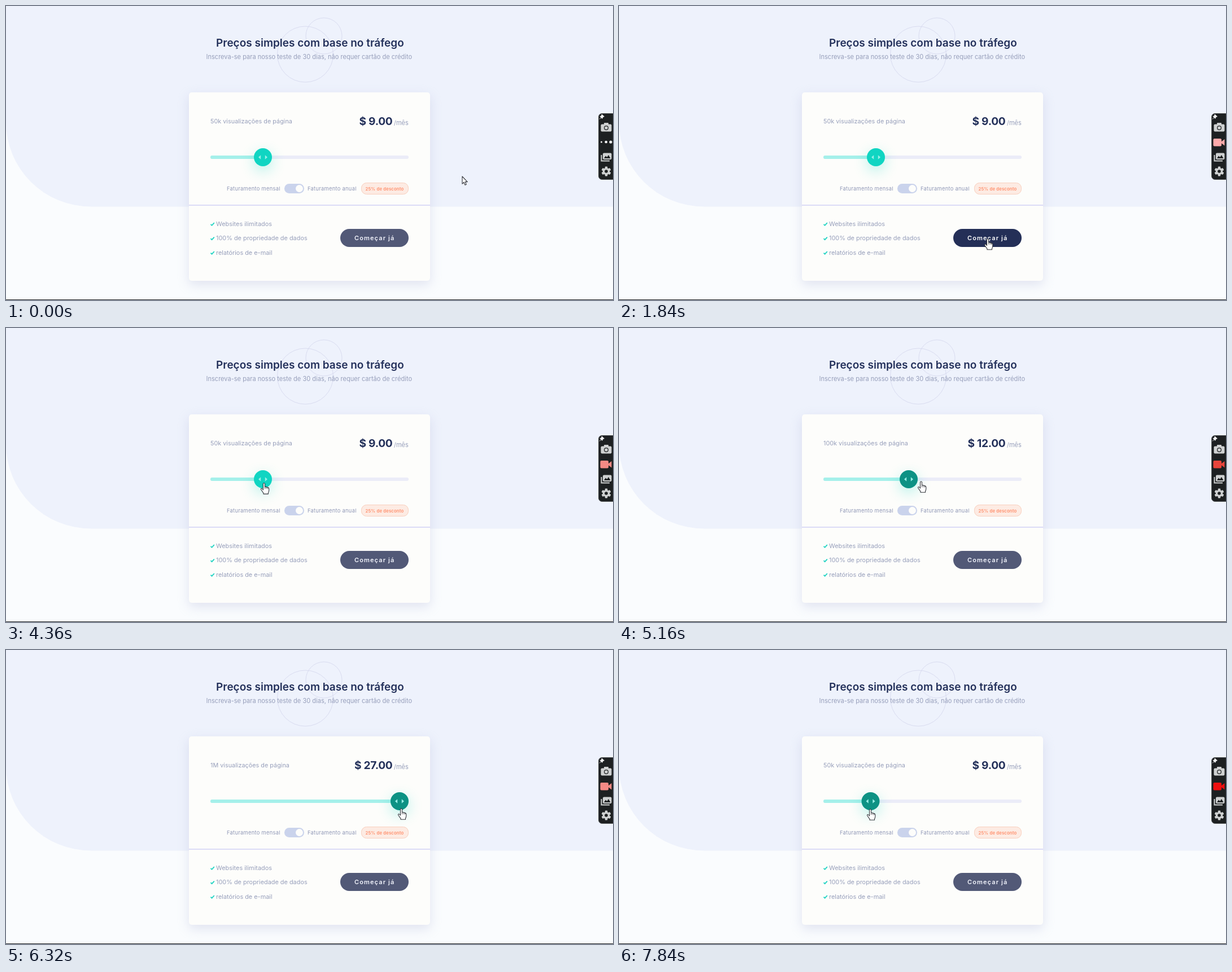
Recreate the animation shown at these times as an HTML page with a canvas. Size 1075 px wide and 521 px high, loop 8000 ms.

```html
<!DOCTYPE html>
<html lang="pt">
<head>
<meta charset="utf-8">
<title>Preços</title>
<style>
html, body { margin: 0; width: 100%; height: 100%; overflow: hidden; background: #fafcfe; }
canvas { display: block; width: 1075px; height: 521px; }
</style>
</head>
<body>
<canvas id="stage" width="1075" height="521"></canvas>
<script>
const ctx = document.getElementById('stage').getContext('2d');
const LOOP = 8000, STEP = 40;
const TEAL = '#10d5c2', NAVY = '#23305a', GREY = '#979fbb', ICON = '#cfd1d1', BAR = '#1d2021';

// time, x, y of the pointer tip
const pointerPath = [
  [0, 808, 302], [80, 808, 302], [640, 758.5, 360.5], [1200, 668, 411], [1840, 653.5, 412.5],
  [2120, 600, 436], [2560, 470, 432], [3160, 502.5, 329], [3720, 502.5, 329],
  [4300, 457, 275], [4600, 459, 274], [5160, 535.5, 272], [6320, 700.5, 281],
  [6520, 700.5, 281], [7840, 445.5, 282]
];
const knobPath = [[4600, 455], [5160, 513], [6320, 697], [6520, 697], [7840, 445.5]];
const plans = [['10k', '6'], ['50k', '9'], ['100k', '12'], ['500k', '18'], ['1M', '27']];
const recColors = [
  [1400, '#ffaaaa'], [2440, '#e8453c'], [3440, '#f48a85'],
  [4480, '#e8453c'], [5600, '#f48a85'], [6560, '#ee0f0f']
];

const arrow = new Path2D('M0 0V13.2L3 10.4L5 15.2L7.2 14.2L5.2 9.6H9.2Z');
const hand = new Path2D('M-2 1.5Q-2 0 -.5 0Q1 0 1 1.5V6.3L3.3 6.8L6 7.6Q8.3 8.2 8.3 10V13Q8 16 7 17.3V19.3H-1.5V17.6L-5.5 12Q-6.5 10 -5 9.5Q-4 9.3 -2 12Z');
const fingers = new Path2D('M1 6V10M3.5 7V10.3M6 7.8V10.6');

function along(path, t) {
  if (t <= path[0][0]) return path[0].slice(1);
  for (let i = 1; i < path.length; i++) {
    const a = path[i - 1], b = path[i];
    if (t <= b[0]) {
      const k = (t - a[0]) / (b[0] - a[0]);
      return a.slice(1).map((v, j) => v + (b[j + 1] - v) * k);
    }
  }
  return path[path.length - 1].slice(1);
}

function box(x, y, w, h, r, fill, stroke) {
  ctx.beginPath();
  ctx.roundRect(x, y, w, h, r);
  paint(fill, stroke);
}

function disc(x, y, r, fill, stroke) {
  ctx.beginPath();
  ctx.arc(x, y, r, 0, Math.PI * 2);
  paint(fill, stroke);
}

function poly(points, fill) {
  ctx.beginPath();
  for (let i = 0; i < points.length; i += 2) ctx.lineTo(points[i], points[i + 1]);
  ctx.closePath();
  paint(fill);
}

function paint(fill, stroke) {
  if (fill) { ctx.fillStyle = fill; ctx.fill(); }
  if (stroke) { ctx.strokeStyle = stroke; ctx.stroke(); }
}

function shadow(color, blur, dy, draw) {
  ctx.save();
  ctx.shadowColor = color;
  ctx.shadowBlur = blur;
  ctx.shadowOffsetY = dy;
  draw();
  ctx.restore();
}

function text(str, x, y, size, color, { weight = 400, align = 'left', space = 0 } = {}) {
  ctx.font = `${weight} ${size}px Inter, "Open Sans", sans-serif`;
  ctx.letterSpacing = space + 'px';
  ctx.textAlign = align;
  ctx.fillStyle = color;
  ctx.fillText(str, x, y);
}

function drawBackdrop() {
  ctx.fillStyle = '#fafcfe';
  ctx.fillRect(0, 0, 1075, 521);
  box(0, 0, 1075, 355.5, [0, 0, 0, 150], '#eef2fc');
  ctx.lineWidth = 1;
  disc(530, 85.5, 49.5, null, '#d9dcf0');
  disc(563, 53, 32, null, '#d9dcf0');
  ctx.fillStyle = '#202124';
  ctx.fillRect(0, 520, 1075, 1);
  text('Preços simples com base no tráfego', 372, 72, 19, NAVY, { weight: 600 });
  text('Inscreva-se para nosso teste de 30 dias, não requer cartão de crédito', 354.5, 94, 11.05, GREY);
}

function drawSlider(x, pressed) {
  box(362, 265, 351, 6, 3, '#ebecf8');
  box(362, 265, x - 362, 6, 3, '#a5f0ea');
  shadow('rgba(16, 216, 196, .3)', 24, 8, () => disc(x, 268, 16, pressed ? '#0d9284' : TEAL));
  for (const s of [-1, 1]) {
    poly([x + s * 8, 268, x + s * 3.8, 264.2, x + s * 3.8, 271.8], '#98efe6');
  }
}

function drawCard(knob, pressed, onToggle, onButton) {
  shadow('rgba(165, 172, 210, .3)', 20, 7, () => box(324, 153, 427, 334, 5, '#fdfdfb'));
  ctx.fillStyle = '#dcdcf6';
  ctx.fillRect(324, 352, 427, 2);

  const tier = Math.min(4, Math.floor((knob - 378) / 319 * 5));
  const [views, price] = plans[tier];
  text(views + ' visualizações de página', 362, 208, 10.85, GREY);
  text(`$ ${price}.00`, 684.5, 211, 19.2, NAVY, { weight: 700, align: 'right', space: -.3 });
  text('/mês', 687, 211, 11, GREY);
  drawSlider(knob, pressed);

  const small = { space: .3 };
  text('Faturamento mensal', 391, 326.5, 9.3, '#8f97b6', small);
  text('Faturamento anual', 534, 326.5, 9.3, '#8f97b6', small);
  box(493, 315, 35, 17, 8.5, onToggle ? '#a0f1e8' : '#cad3ec');
  disc(519.5, 323.5, 6.5, '#fdfdfb');
  box(629.5, 313.5, 83, 20, 9, '#fdebe3', '#f9cfbd');
  text('25% de desconto', 636.5, 326.5, 7.8, '#ff8f6c', { weight: 600, space: .12 });

  ['Websites ilimitados', '100% de propriedade de dados', 'relatórios de e-mail'].forEach((item, i) => {
    const y = 390 + i * 25.4;
    ctx.lineWidth = 1.8;
    ctx.beginPath();
    ctx.moveTo(362.5, y - 3.2);
    ctx.lineTo(364.6, y - 1.2);
    ctx.lineTo(368.8, y - 5.8);
    paint(null, '#1fd3c2');
    ctx.lineWidth = 1;
    text(item, 372, y, 10.9, GREY);
  });

  box(592, 395, 121, 32, 16, onButton ? '#242f57' : '#525977');
  text('Começar já', 617, 415, 11, onButton ? '#ffffff' : '#f2f4fc', { weight: 600, space: 1.1 });
}

function drawCamera() {
  box(1053.5, 209.5, 19, 13, 2, ICON);
  box(1059, 207, 8, 5, 1, ICON);
  disc(1063, 216, 4, BAR);
  disc(1063, 216, 2.8, ICON);
}

function drawRecord(t) {
  const state = recColors.filter(c => c[0] <= t).pop();
  if (state) {
    box(1052.5, 235, 14.5, 13.5, 2, state[1]);
    poly([1066, 241, 1072.5, 236, 1072.5, 247.5, 1066, 242.5], state[1]);
    return;
  }
  for (let i = 0; i < 3; i++) {
    const wave = Math.max(0, Math.sin(t / 1000 * Math.PI * 2 - i * .9 + 3.14));
    disc(1054.5 + i * 8.2, 241, 1.5 + wave * 1.1, '#f4f4f4');
  }
}

function drawGallery() {
  ctx.lineWidth = 2;
  ctx.beginPath();
  ctx.moveTo(1054.5, 264);
  ctx.lineTo(1054.5, 274.5);
  ctx.lineTo(1069, 274.5);
  paint(null, ICON);
  ctx.lineWidth = 1;
  box(1057, 260.5, 15.5, 11.5, 2, ICON);
  poly([1059, 270, 1062, 265.5, 1064.3, 268, 1067, 264, 1070.5, 270], BAR);
}

function drawGear() {
  ctx.save();
  ctx.translate(1063, 293);
  for (let i = 0; i < 6; i++) {
    box(-2.2, -8.5, 4.4, 5, 1, ICON);
    ctx.rotate(Math.PI / 3);
  }
  disc(0, 0, 6.2, ICON);
  disc(0, 0, 2.8, BAR);
  ctx.restore();
}

function drawToolbar(t) {
  ctx.lineWidth = 1;
  box(1049.5, 190.5, 40, 117, 6, BAR, '#55585a');
  poly([1055, 191.5, 1060, 196, 1057.5, 197, 1056, 200, 1051.5, 195.5, 1054, 194.5], '#f1f1f1');
  ctx.beginPath();
  ctx.moveTo(1054, 197.5);
  ctx.lineTo(1051, 200.5);
  paint(null, '#f1f1f1');
  drawCamera();
  drawRecord(t);
  drawGallery();
  drawGear();
}

function drawPointer(x, y, linked) {
  ctx.save();
  ctx.translate(x, y);
  ctx.lineJoin = 'round';
  ctx.lineWidth = 1.1;
  ctx.fillStyle = '#ffffff';
  ctx.strokeStyle = '#33353b';
  const shape = linked ? hand : arrow;
  ctx.fill(shape);
  ctx.stroke(shape);
  if (linked) {
    ctx.lineWidth = .8;
    ctx.stroke(fingers);
  }
  ctx.restore();
}

const inside = (x, y, l, t, r, b) => x >= l && x <= r && y >= t && y <= b;

function frame(now) {
  const t = Math.floor(now % LOOP / STEP) * STEP;
  const [x, y] = along(pointerPath, t);
  const [knob] = along(knobPath, t);
  const pressed = t >= 4560;
  const onButton = inside(x, y, 592, 395, 713, 427);
  const onToggle = inside(x, y, 493, 315, 528, 332);
  const onKnob = Math.hypot(x - knob, y - 268) < 16;
  drawBackdrop();
  drawCard(knob, pressed, onToggle, onButton);
  drawToolbar(t);
  drawPointer(x, y, pressed || onButton || onToggle || onKnob);
}

const start = performance.now();
function loop() {
  frame(performance.now() - start);
  requestAnimationFrame(loop);
}
loop();
</script>
</body>
</html>
```
